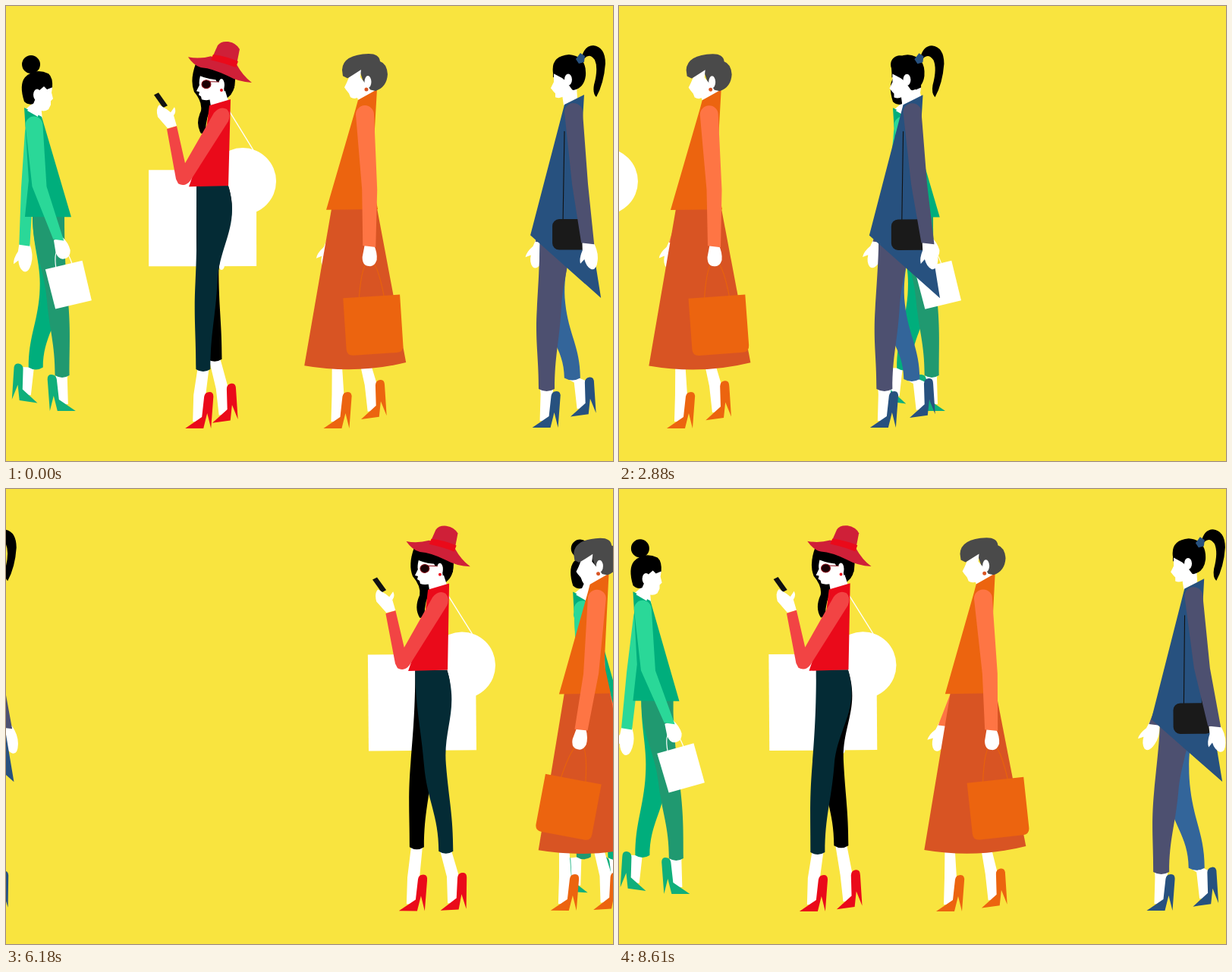
An HTML page for the animation above (8.67 s loop, 800 by 600 pixels).

```html
<!DOCTYPE html>
<html lang="en">
<head>
<meta charset="utf-8">
<title>Walkers</title>
<style>
html,body{margin:0;width:100%;height:100%;overflow:hidden;background:#f9e43f}
svg{display:block;width:100vw;height:100vh}
.w{fill:#fff}.k{fill:#000}
</style>
</head>
<body>
<svg id="stage" viewBox="0 0 800 600"></svg>
<script>
const LOOP = 8670, STEP = 60, CYCLE = LOOP / 9;
const NS = 'http://www.w3.org/2000/svg';
const SHOE = 'M0 0L22-15 25-42Q26-48 32-48Q38-48 37-40L34 0 29-20 24 0Z';
const OPEN_HAND = 'M-7-2H7Q13 12 10 24Q7 37 0 34Q-6 30-7 20L-13 25Q-14 18-8 8Z';
const FIST = 'M-6-2H6Q11 8 10 18Q7 27 0 26Q-9 26-9 14Z';

// One leg through its cycle: phase, forward swing, lift, foot angle, shin lean, knee bend
const GAIT = [
  [0, 0, 0, 0, 24, 2], [.2, 0, 0, 0, 23, 2], [.31, 0, 0, 0, 20, 2],
  [.46, 0, 0, 0, 8, 9], [.5, 0, .18, -8, 6, 10], [.562, .05, .48, -8, 3, 13],
  [.68, .13, 1, -9, -3, 20], [.74, .35, .92, -4, 6, 19],
  [.808, .64, .63, 2, 18, 17], [.9, .93, .2, 1, 22, 8], [1, 1, 0, 0, 24, 2]
];

const people = [
  { // green
    v: -117, span: 1013, edge: 805, flip: -1, x: 56, hipY: 276, ground: 534,
    front: -43, rear: 15, lift: 22, k: 1.6, lean: .75, h: 47,
    hip: 21, back: 21, knee: 14, cuff: 9.5,
    near: '#209970', far: '#00ae7c', shoe: '#10af7b',
    arm: { s: [37, 157], w: [11.5, 9.5, 7], ey: 238, wy: 311, e: [5, 3], r: [20, 18], fill: '#2ad898', hand: FIST },
    farArm: { s: [35, 165], w: [10, 8, 7], ey: 240, wy: 316, e: [4, -16], r: [12, -33], fill: '#2ad898', hand: OPEN_HAND },
    bag: { turn: [-5, -12], drop: 12, art: '<path d="M-9 24Q-7 0 2 0Q11 0 13 24" fill="none" stroke="#fff" stroke-width="1.2"/><path class="w" d="M-23 22H27V76H-22Z"/>' },
    torso: `<path class="w" d="M26 136L45 120 48 150Z"/>
      <path fill="#00ae7c" d="M24 134L47 146 86 278H25L30 230Z"/>
      <circle class="k" cx="33" cy="77" r="12"/>
      <path class="k" d="M24 126Q17 104 25 94Q38 81 56 89Q62 94 61 108L48 113 36 129Q29 131 24 126Z"/>
      <path class="w" d="M50 106L54 110 61 107 60 114 62 122 59 125 59 130 56 136Q50 140 44 137L42 146 28 138 36 129 43 112Z"/>
      <ellipse class="w" cx="41" cy="117" rx="5" ry="7.5"/>`
  },
  { // red
    v: 115, span: 999, edge: 362, flip: 1, x: 272, hipY: 237, ground: 557,
    front: -43, rear: 15, rearFar: 6, lift: 15, k: .7, lean: 1, h: 78, hFar: 84,
    hip: 21, back: 21, bulge: 8, knee: 14.5, cuff: 9.5,
    near: '#042b35', far: '#000', shoe: '#ea0a1a',
    behind: `<path d="M294 138L326 190" stroke="#fff" stroke-width="1.3"/>
      <path class="w" d="M188 216H330V343H188Z"/><circle class="w" cx="312" cy="231" r="44"/>
      <ellipse class="w" cx="284" cy="341" rx="4" ry="7"/>`,
    torso: `<path class="k" d="M250 76Q242 98 248 113Q259 126 257 138Q249 155 257 168L263 167Q263 145 272 132L292 121Q303 113 302 94L270 80Z"/>
      <path class="w" d="M268 120L289 112 293 125 270 132Z"/>
      <path class="w" d="M256 92Q254 100 255 104L251 112 255 113 254 117 257 119 258 123Q266 126 277 121L288 115 286 97Q270 98 256 92Z"/>
      <path class="k" d="M272 90L300 93 301 108 290 115 290 101 278 100Z"/>
      <ellipse class="w" cx="284" cy="104" rx="4" ry="8"/>
      <circle cx="284" cy="111" r="2" fill="#ea0a1a"/>
      <ellipse cx="264" cy="103" rx="6" ry="5.5" fill="#1a0004" stroke="#8a0c18"/>
      <path d="M268 99.5L281 100" stroke="#8a0c18"/>
      <path fill="#cf2038" d="M270 72L279 52Q283 46 293 47Q304 49 308 57L303 82Z"/>
      <path fill="#cf2038" d="M240 67Q255 70 270 66L304 77Q312 92 324 101Q306 100 292 92Q272 82 258 81Q248 79 240 67Z"/>
      <path fill="#ea0a1a" d="M273 64Q290 66 306 73L303 81Q288 75 270 71Z"/>
      <path fill="#ea0a1a" d="M268 131L296 123 293 237 241 238 262 178Z"/>
      <path d="M195 117L201 114 213 131 207 134Z" fill="#111"/>
      <path class="w" d="M213 161L200 146Q197 135 202 130L212 136 217 140 222 133Q225 139 221 144L225 158Z"/>
      <path fill="#f24444" d="M274 141Q282 131 291 136Q297 142 293 152L243 230Q236 239 227 234L224 228 212 162 225 158 236 207Z"/>`
  },
  { // orange
    v: 123, span: 1066, edge: 532, flip: 1, x: 458, ground: 557,
    front: -47, rear: 13, lift: 25, k: 1, lean: .75, h: 86, cuff: 8.5, shoe: '#ec640f',
    arm: { s: [473, 143], w: [12, 10, 8.5], ey: 242, wy: 317, e: [0, 9], r: [-6, 17], fill: '#fe7544', hand: FIST },
    farArm: { s: [470, 145], w: [10, 8, 7], ey: 242, wy: 317, e: [-9, -15], r: [-14, -40], fill: '#fe7544', hand: OPEN_HAND },
    bag: { turn: [2.5, -9], drop: 13, art: '<path d="M-17 54Q-10 6 0 6Q10 6 16 54" fill="none" stroke="#e8620c" stroke-width="1.2"/><path fill="#ec640f" d="M-38 53H37V120Q37 129 28 129H-29Q-38 129-38 120Z"/>' },
    torso: `<path fill="#d85423" d="M429 267H489L527 470Q462 486 393 474Z"/>
      <path class="w" d="M460 112L486 104 488 112 464 124Z"/>
      <path fill="#ec640f" d="M464 124L489 110 482 230 490 268 422 268.5 461 135Z"/>
      <path fill="#4a4a4a" d="M443 84Q444 64 478 63Q492 63 493 73Q502 76 503 90Q502 107 487 112L474 109 467 88 450 95 444 92Z"/>
      <path class="w" d="M452 94L468 84 467 94 476 105 480 110 472 119 467 119Q460 124 454 120L452 115 448 110 446 107 449 101Z"/>
      <ellipse class="w" cx="477" cy="100" rx="4.5" ry="8"/>
      <circle cx="475" cy="110" r="2.5" fill="#d85423"/>`
  },
  { // blue
    v: 125.5, span: 1090, edge: 800, flip: 1, x: 725, hipY: 285, ground: 556,
    front: -39, rear: 22, lift: 30, k: 1, lean: .8, h: 51,
    hip: 21, back: 21, knee: 16, cuff: 10.5,
    near: '#4d5070', far: '#33659a', shoe: '#27517f',
    arm: { s: [748, 140], w: [12, 10.5, 8.5], ey: 235, wy: 314, e: [3, 8], r: [-4, 33], fill: '#4d5070', hand: OPEN_HAND },
    farArm: { s: [747, 140], w: [11, 9, 7], ey: 235, wy: 316, e: [-5, -18], r: [-13, -43], fill: '#4d5070', hand: OPEN_HAND },
    torso: `<path class="w" d="M732 110L752 104 753 122 735 131Z"/>
      <path fill="#27517f" d="M736 130L762 117 760 150 761 240 784 385 691 302Z"/>
      <path d="M736 165L734 282M757 165L758 282" stroke="#111" stroke-width="1.1"/>
      <rect x="720" y="281" width="52" height="40.5" rx="9" fill="#1a1a1a"/>
      <path class="k" d="M758 70Q762 52 774 52Q790 54 790 76Q788 102 778 120Q773 115 775 104Q781 82 776 71Q768 60 760 72Z"/>
      <path class="k" d="M721 88Q718 66 742 64Q766 66 764 92Q762 108 748 111L740 108 733 97 725 92 721 94Z"/>
      <path class="w" d="M722 89L733 95 738 99 746 110 742 118 737 118Q730 123 724 120L724 115 722 113 718 108 722 100Z"/>
      <ellipse class="w" cx="741" cy="97" rx="5" ry="7.5"/>
      <path fill="#27517f" d="M757 62L763 66 762 74 755 76 751 70Z"/>`
  }
];

const lerp = (a, b, u) => a + (b - a) * u;
const wrap = n => n - Math.floor(n);

function add(parent, tag, attrs = {}, html) {
  const el = document.createElementNS(NS, tag);
  for (const key in attrs) el.setAttribute(key, attrs[key]);
  if (html) el.innerHTML = html;
  return parent.appendChild(el);
}
const put = (el, key, value) => el.setAttribute(key, value);

function gaitAt(q) {
  let i = 1;
  while (GAIT[i][0] < q) i++;
  const a = GAIT[i - 1], b = GAIT[i], u = (q - a[0]) / (b[0] - a[0]);
  return a.map((n, j) => lerp(n, b[j], u));
}

function makeLeg(p, parent, far) {
  const g = add(parent, 'g', { transform: `translate(${p.x} 0) scale(${p.flip} 1)` });
  const calf = add(g, 'path', { class: 'w' });
  const shoe = add(g, 'path', { d: SHOE, fill: p.shoe });
  const cloth = p.hip && add(g, 'path', { fill: far ? p.far : p.near });
  const rear = far && p.rearFar || p.rear, h = far && p.hFar || p.h;

  return (q, bob) => {
    const [, swing, lift, turn, lean, bend] = gaitAt(q);
    const x = q < .5 ? lerp(p.front, rear, q * 2) : lerp(rear, p.front, swing ** p.k);
    const y = p.ground - lift * p.lift;
    const c = Math.cos(turn * Math.PI / 180), s = Math.sin(turn * Math.PI / 180);
    const foot = (a, b) => `${x + a * c - b * s} ${y + a * s + b * c}`;
    const ax = x + lean * p.lean, ay = y - h, w = p.cuff;
    put(shoe, 'transform', `translate(${x} ${y}) rotate(${turn})`);
    put(calf, 'd', `M${ax - w + 2} ${ay}L${foot(11, -44)}L${foot(10, -9)}L${foot(25, -8)}L${foot(27, -44)}L${ax + w - 2} ${ay}Z`);
    if (!cloth) return;
    const hy = p.hipY + bob, len = ay - hy, slope = ax / len;
    const kx = ax * .55 - bend * p.lift / 25, ky = hy + len * .52, d = len * .2;
    const edge = k => [kx + k - slope * d, ky - d, kx + k, ky, kx + k + slope * d, ky + d];
    const f = edge(-p.knee), b = edge(p.knee), bulge = p.bulge || 0;
    put(cloth, 'd', `M${-p.hip} ${hy}C${-p.hip} ${hy + d} ${f[0]} ${f[1]} ${f[2]} ${f[3]}` +
      `C${f[4]} ${f[5]} ${ax - w} ${ay - d} ${ax - w} ${ay}Q${ax} ${ay + 6} ${ax + w} ${ay}` +
      `C${ax + w} ${ay - d} ${b[4]} ${b[5]} ${b[2]} ${b[3]}` +
      `C${b[0]} ${b[1]} ${p.back + bulge * 2} ${hy + d * 1.1} ${p.back} ${hy}Z`);
  };
}

function makeArm(a, parent, bag) {
  const load = bag && add(parent, 'g', {}, bag.art);
  const hand = add(parent, 'path', { class: 'w', d: a.hand });
  const sleeve = add(parent, 'path', { fill: a.fill });
  const [sx, sy] = a.s, [w0, w1, w2] = a.w;

  return s => {
    const ex = sx + a.e[0] + a.e[1] * s, dx = a.r[0] + a.r[1] * s;
    const wx = sx + dx, wy = a.wy - dx * dx / 400;
    const angle = -Math.atan2(wx - ex, wy - a.ey) * 180 / Math.PI;
    put(sleeve, 'd', `M${sx - w0} ${sy}L${ex - w1} ${a.ey}L${wx - w2} ${wy - 1}L${wx + w2} ${wy + 1}` +
      `L${ex + w1} ${a.ey}L${sx + w0} ${sy}A${w0} ${w0} 0 0 0 ${sx - w0} ${sy}Z`);
    put(hand, 'transform', `translate(${wx} ${wy}) rotate(${angle})`);
    if (load) put(load, 'transform', `translate(${wx} ${wy + bag.drop}) rotate(${bag.turn[0] + bag.turn[1] * s})`);
  };
}

function makePerson(p) {
  const root = add(stage, 'g');
  const layer = html => add(root, 'g', {}, html);
  const back = layer(p.behind);
  const farArm = p.farArm && makeArm(p.farArm, back);
  const farLeg = makeLeg(p, root, true);
  const nearLeg = makeLeg(p, root, false);
  const body = layer(p.torso);
  const arm = p.arm && makeArm(p.arm, body, p.bag);

  return ms => {
    const phase = ms / CYCLE;
    const bob = 2 * Math.cos(4 * Math.PI * (phase + .12));
    const swing = Math.cos(2 * Math.PI * (phase + .13));
    const tilt = -.28 * bob * p.flip;
    let dx = -p.v * ms / 1000;
    if (p.v > 0 && dx < -p.edge) dx += p.span;
    if (p.v < 0 && dx > p.edge) dx -= p.span;
    put(root, 'transform', `translate(${dx} 0)`);
    for (const g of [back, body]) put(g, 'transform', `translate(0 ${bob}) rotate(${tilt} ${p.x} 150)`);
    nearLeg(wrap(phase + .062), bob);
    farLeg(wrap(phase + .562), bob);
    if (arm) arm(swing);
    if (farArm) farArm(swing);
  };
}

const stage = document.getElementById('stage');
const walkers = people.map(makePerson);
const start = performance.now();

function draw() {
  const t = (performance.now() - start) % LOOP;
  const late = t < 7590 ? 0 : 30; // one step is held half a beat longer
  const ms = Math.floor((t - late) / STEP) * STEP + late;
  walkers.forEach(move => move(ms));
  requestAnimationFrame(draw);
}
draw();
</script>
</body>
</html>
```
